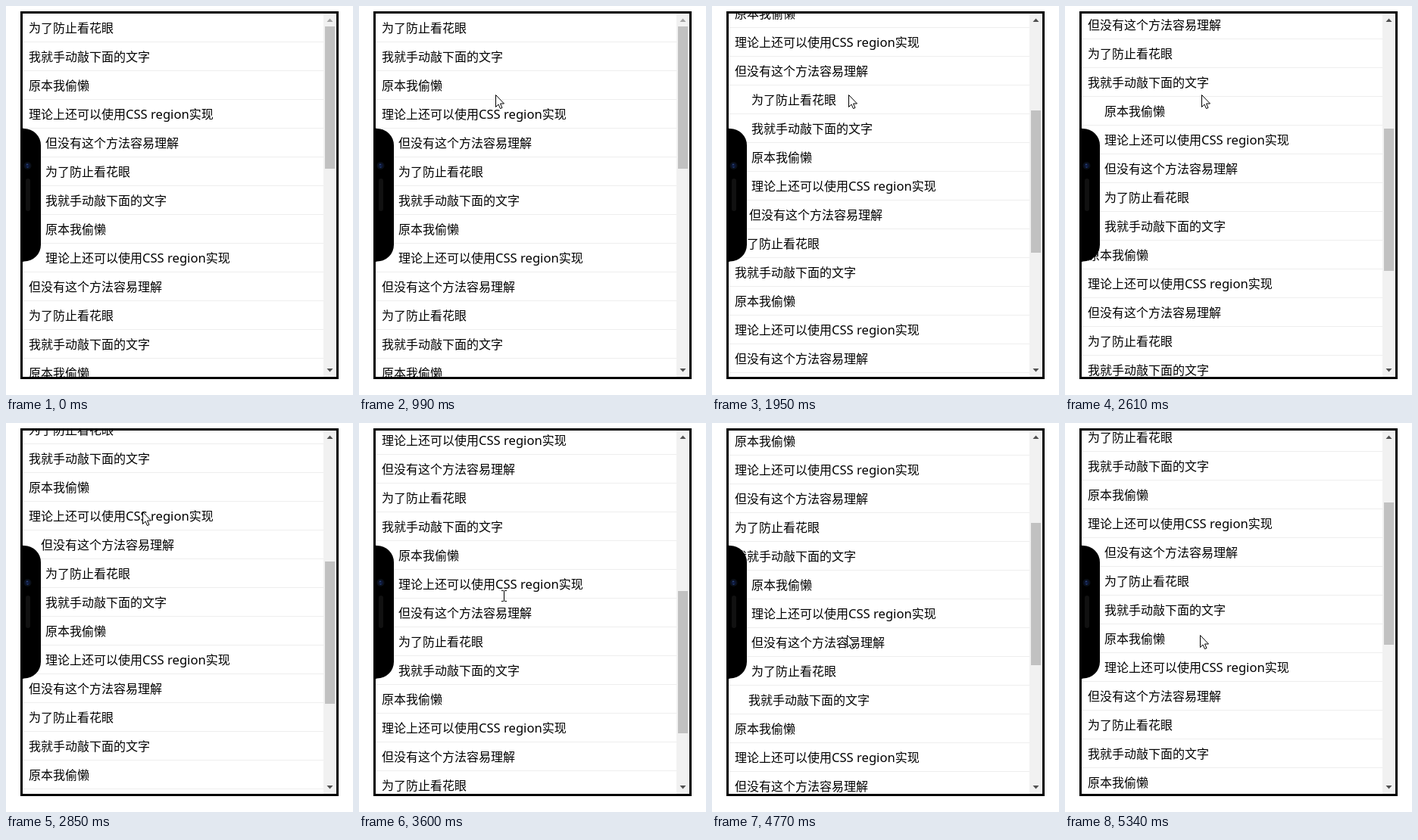
Write an HTML page that moves like this. It is 458 px wide and 514 px high and loops after 5370 ms.

```html
<!DOCTYPE html>
<html lang="zh-CN">
<head>
<meta charset="utf-8">
<style>
  html, body { margin: 0; width: 100%; height: 100%; overflow: hidden; background: #fff; }
  svg { display: block; }
  text { font: 350 16px "Noto Sans CJK SC", "Noto Sans CJK", sans-serif; white-space: pre; }
  .latin { font: 400 16.6px "Noto Sans", sans-serif; }
</style>
</head>
<body>
<svg width="458" height="514" viewBox="0 0 458 514">
  <defs><clipPath id="view"><rect x="22" y="10" width="397" height="480"/></clipPath></defs>
  <rect width="458" height="514" fill="#fff"/>
  <g clip-path="url(#view)"><g id="list"></g></g>

  <rect x="419" y="10" width="17" height="480" fill="#f1f1f1"/>
  <rect id="thumb" x="421" width="13" height="188" fill="#c1c1c1"/>
  <path id="up" d="M423.500 21h8l-4-4.500z"/>
  <path d="M423.500 479h8l-4 4.500z" fill="#505050"/>

  <path d="M21 159Q21 162 24 162A22 22 0 0 1 46 184V315.500A22 22 0 0 1 24 337.500Q21 337.500 21 341Z"/>
  <circle cx="28.500" cy="211" r="5" fill="#0a0f18"/>
  <circle cx="28.500" cy="211" r="3" fill="#0d1738"/>
  <circle cx="28" cy="209.500" r="1" fill="#2b4778"/>
  <circle cx="28.500" cy="213" r="1" fill="#203868"/>
  <rect x="26" y="228" width="6" height="43" rx="3" fill="#111"/>
  <rect x="20.500" y="8.500" width="417" height="483" fill="none" stroke="#000" stroke-width="3"/>

  <g id="cursor">
    <path id="arrow" d="M.5.5V16.500L4 13L6.500 18.500L9 17.500L6.500 12H11.500Z" fill="#fff" stroke="#000"/>
    <path id="beam" d="M6 1.500H9M10 1.500H13M9.500 2V15M6 15.500H9M10 15.500H13" fill="none" stroke="#000"/>
  </g>
</svg>
<script>
const LOOP = 5370, STEP = 30;
const ROWS = 30, ROW_H = 38, TOP = 10, LINE_TOP = 8, LINE_H = 21;
const NOTCH = { top: 162, bottom: 338, radius: 24 };
const LAYOUT_LAG = 74; // the text wrap follows the scroll position late
const PHRASES = ['为了防止看花眼', '我就手动敲下面的文字', '原本我偷懒',
  '理论上还可以使用CSS region实现', '但没有这个方法容易理解'];

// wheel ticks: start, distance, duration
const TICKS = [
  [1070, 100, 250], [1267, 100, 180], [1816, 100, 180], [2486, 100, 260],
  [2950, 100, 180], [4283, -100, 180], [4480, -100, 180], [4705, -100, 180]
];
// pointer path: time, x, y
const POINTER = [
  [30, 322, 460], [180, 190, 340], [330, 45, 250], [450, 120, 74], [570, 180, 117],
  [3330, 180, 117], [3600, 182, 220], [3870, 178, 280], [LOOP, 178, 280]
];
const BEAM_TIMES = [[1140, 1380], [3510, 3690]];

const $ = id => document.getElementById(id);
const clamp = (v, lo, hi) => Math.min(hi, Math.max(lo, v));
const ease = p => (1 - Math.cos(Math.PI * clamp(p, 0, 1))) / 2;
const scrollAt = t => TICKS.reduce((sum, [start, dist, dur]) => sum + dist * ease((t - start) / dur), 0);

function make(tag, attrs, parent) {
  const el = document.createElementNS('http://www.w3.org/2000/svg', tag);
  for (const key in attrs) el.setAttribute(key, attrs[key]);
  return parent.appendChild(el);
}

const labels = Array.from({ length: ROWS }, (_, i) => {
  const y = TOP + i * ROW_H;
  make('rect', { x: 22, y: y + ROW_H - 1, width: 397, height: 1, fill: '#eee' }, $('list'));
  const label = make('text', { x: 30, y: y + 25 }, $('list'));
  for (const run of PHRASES[i % PHRASES.length].match(/[ -~]+|[^ -~]+/g)) {
    make('tspan', /^[ -~]/.test(run) ? { class: 'latin' } : {}, label).textContent = run;
  }
  return label;
});

// left edge of a line that overlaps the rounded notch shape
function lineStart(lineTop, shift) {
  const r = NOTCH.radius;
  const depth = Math.min(lineTop + LINE_H - NOTCH.top - shift, NOTCH.bottom + shift - lineTop);
  if (depth <= 0) return 30;
  const reach = Math.sqrt(r * r - (r - Math.min(depth, r)) ** 2);
  return Math.max(30, 28 + (reach > 22 ? r : reach));
}

function pointerAt(t) {
  const next = Math.max(1, POINTER.findIndex(p => p[0] >= t));
  const [t0, x0, y0] = POINTER[next - 1], [t1, x1, y1] = POINTER[next];
  const k = ease((t - t0) / (t1 - t0));
  return [Math.round(x0 + (x1 - x0) * k), Math.round(y0 + (y1 - y0) * k)];
}

function render(t) {
  const scroll = Math.round(scrollAt(t));
  const shift = scrollAt(t - LAYOUT_LAG) - scroll;
  $('list').setAttribute('transform', `translate(0 ${-scroll})`);
  labels.forEach((label, i) =>
    label.setAttribute('x', Math.floor(lineStart(TOP + i * ROW_H + LINE_TOP - scroll, shift))));

  $('thumb').setAttribute('y', 27 + Math.floor(scroll * 258 / 660));
  $('up').setAttribute('fill', scroll > 0 ? '#505050' : '#a3a3a3');

  const beam = BEAM_TIMES.some(([from, to]) => t >= from && t < to);
  $('cursor').setAttribute('visibility', t < POINTER[0][0] ? 'hidden' : 'visible');
  $('cursor').setAttribute('transform', `translate(${pointerAt(t)})`);
  $('arrow').setAttribute('display', beam ? 'none' : 'inline');
  $('beam').setAttribute('display', beam ? 'inline' : 'none');
}

const origin = performance.now();
function tick() {
  const t = (performance.now() - origin) % LOOP;
  render(Math.floor(t / STEP) * STEP);
  requestAnimationFrame(tick);
}
render(0);
requestAnimationFrame(tick);
</script>
</body>
</html>
```
